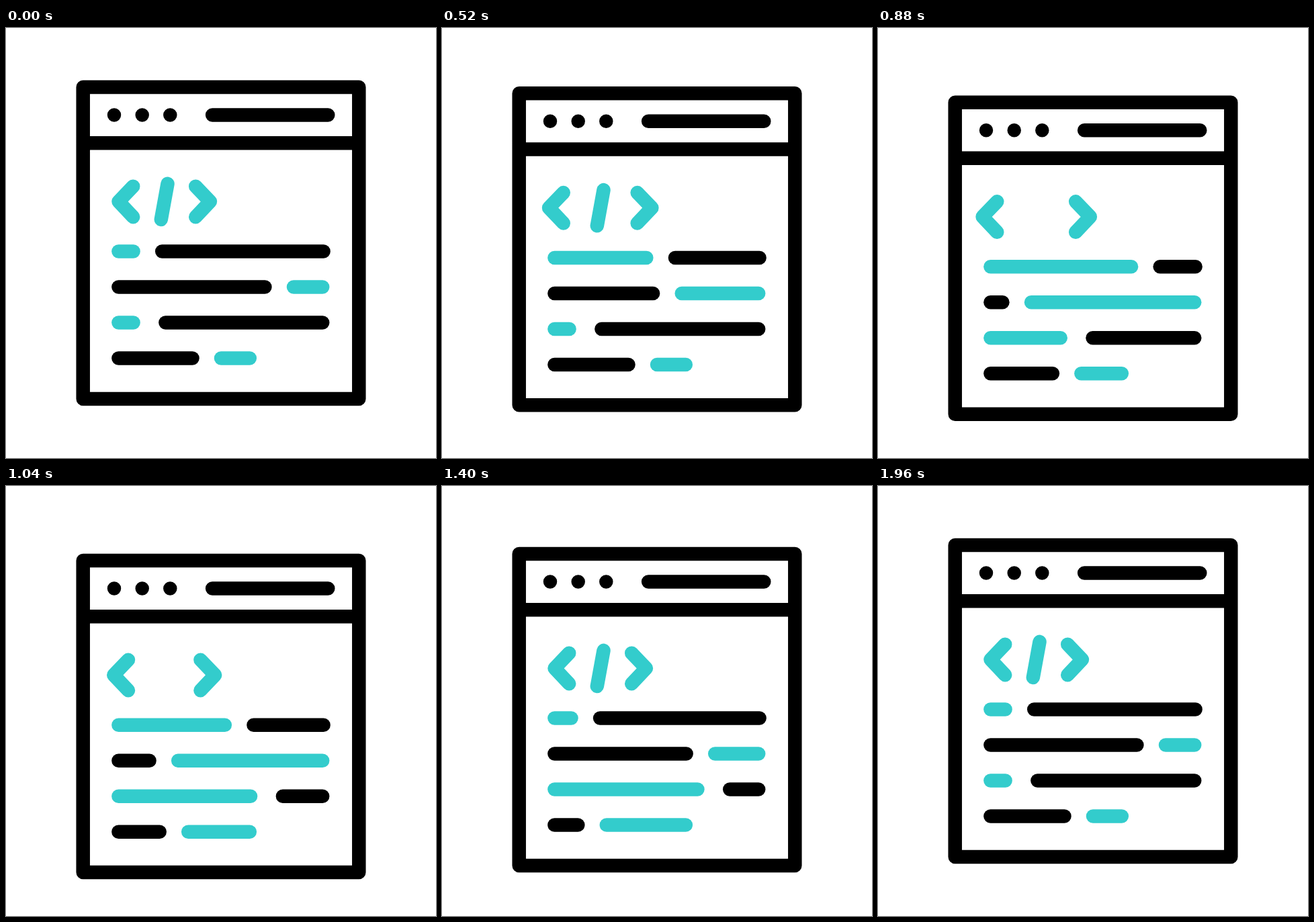
Animation, 640 px wide and 640 px high, one loop 2 s. Source, as an HTML page:

```html
<!DOCTYPE html>
<html lang="en">
<head>
<meta charset="utf-8">
<title>Code window</title>
<style>
  html, body { margin: 0; width: 100%; height: 100%; overflow: hidden; background: #fff; }
  svg { display: block; width: 100%; height: 100%; }
  path { fill: none; stroke: #000; stroke-width: 20.5; stroke-linecap: round; stroke-linejoin: round; }
  .teal { stroke: #33cccc; }
</style>
</head>
<body>
<svg viewBox="0 0 640 640">
  <g id="page">
    <path d="M114.7 88H525.3V552H114.7ZM114.7 171.2H525.3"/>
    <path d="M161 129.5h0M202.7 129.5h0M244.3 129.5h0M307.1 129.5H479.3"/>
    <path id="left" class="teal" d="M189.2 235.7L167.5 258.3L189.2 281.2"/>
    <path id="slash" class="teal" d="M240.5 231.8L230.8 285"/>
    <path id="right" class="teal" d="M282.2 235.7L303.9 258.3L282.2 281.2"/>
  </g>
</svg>
<script>
const LOOP = 2000, STEP = 40, START_X = 167.4;
const byId = id => document.getElementById(id);
const page = byId('page'), left = byId('left'), right = byId('right'), slash = byId('slash');

const clamp = v => Math.min(1, Math.max(0, v));
const smooth = s => s * s * (3 - 2 * s);
const ramp = (t, from, to) => smooth(clamp((t - from) / (to - from)));

// Rise over [a, b], hold, fall over [c, d].
const swing = (t, [a, b, c, d]) => ramp(t, a, b) - ramp(t, c, d);

// Cubic bezier easing with control points (x1, 0) and (x2, 1).
function bezier(x, x1, x2) {
  let lo = 0, hi = 1;
  for (let i = 0; i < 24; i++) {
    const s = (lo + hi) / 2, r = 1 - s;
    if (3 * x1 * s * r * r + 3 * x2 * s * s * r + s ** 3 < x) lo = s; else hi = s;
  }
  return smooth((lo + hi) / 2);
}

const pageDrop = t => 23.1 * (t < 1000
  ? bezier(t / 1000, 0.688, 0.47)
  : 1 - bezier(t / 1000 - 1, 0.683, 0.083));

// Two bars per row share a gap that travels by `shift`.
const rows = [
  { y: 332.6, gap: [189.6, 232.2], end: 472.6, shift: 194, times: [158, 803, 810, 1446], tealFirst: true },
  { y: 385.6, gap: [385.4, 428], end: 471.2, shift: -200, times: [285, 868, 888, 1532] },
  { y: 438.6, gap: [189.6, 237.4], end: 471.2, shift: 228, times: [648, 1220, 1260, 1807], tealFirst: true },
  { y: 491.6, gap: [277.5, 320], end: 362.8, shift: -80.5, times: [700, 1295, 1295, 1966] }
];

function addBar(teal) {
  const bar = document.createElementNS('http://www.w3.org/2000/svg', 'path');
  if (teal) bar.setAttribute('class', 'teal');
  return page.appendChild(bar);
}
for (const row of rows) row.bars = [addBar(row.tealFirst), addBar(!row.tealFirst)];

const setBar = (bar, y, x1, x2) => bar.setAttribute('d', `M${x1} ${y}H${x2}`);
const move = (node, x, y) => node.setAttribute('transform', `translate(${x} ${y})`);

function draw(t) {
  move(page, 0, pageDrop(t));
  const spread = 13.1 * swing(t, [140, 775, 775, 1345]);
  move(left, -spread, 0);
  move(right, spread, 0);
  slash.style.display = t >= 540 && t < 1220 ? 'none' : '';
  for (const { y, gap, end, shift, times, bars } of rows) {
    const dx = shift * swing(t, times);
    setBar(bars[0], y, START_X, gap[0] + dx);
    setBar(bars[1], y, gap[1] + dx, end);
  }
}

const began = performance.now();
function tick() {
  const t = (performance.now() - began) % LOOP;
  draw(Math.floor(t / STEP) * STEP);
  requestAnimationFrame(tick);
}
tick();
</script>
</body>
</html>
```
